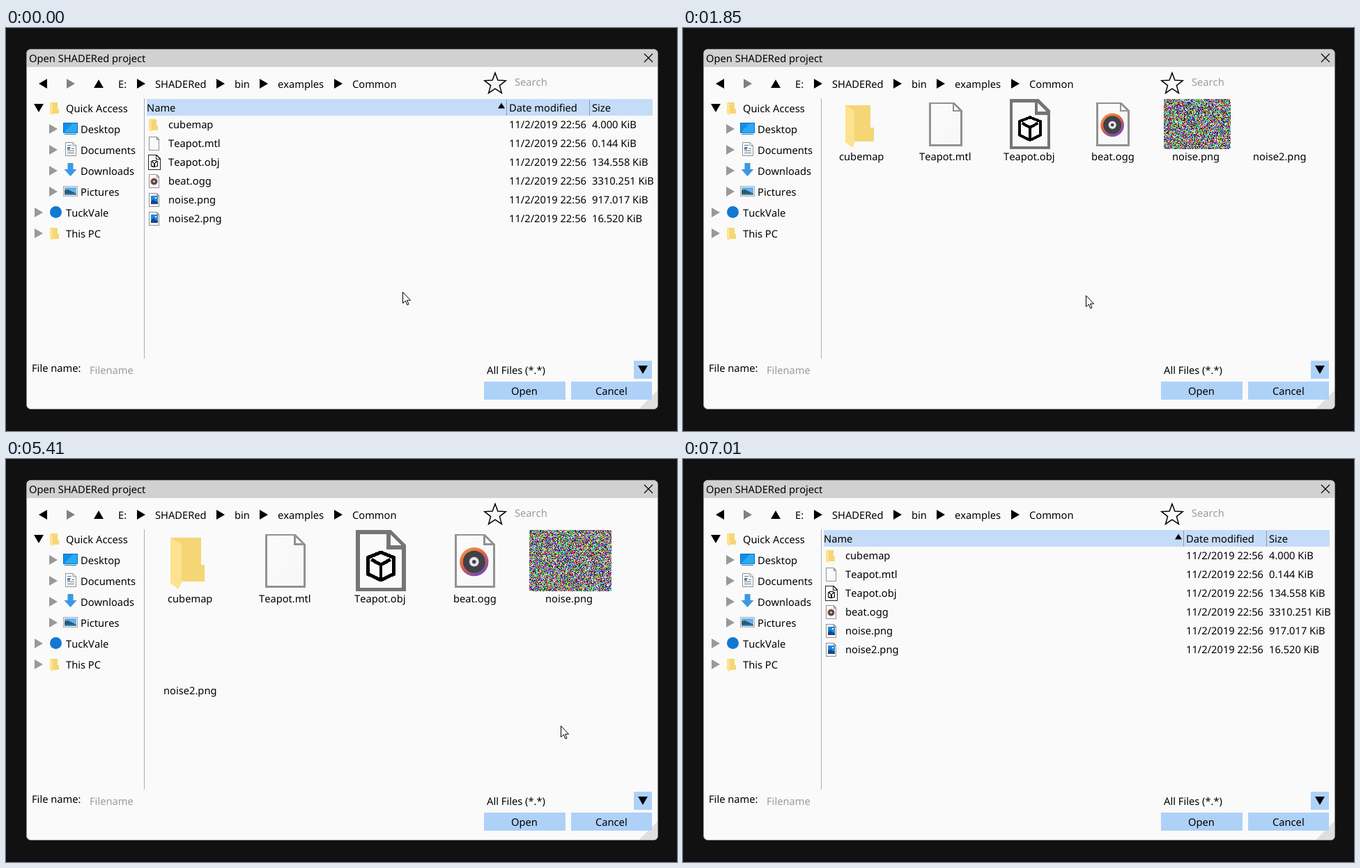
Recreate the animation shown at these times as an HTML page with a canvas. Size 963x579 px, loop 7670 ms.

```html
<!DOCTYPE html>
<html lang="en">
<head>
<meta charset="utf-8">
<title>File dialog</title>
<style>
  html, body { margin: 0; width: 100%; height: 100%; overflow: hidden; background: #111; }
  svg { position: absolute; left: 0; top: 0; display: block; }
  canvas { position: absolute; image-rendering: pixelated; }
  text { font: 14.68px "Noto Sans", sans-serif; font-kerning: none; text-rendering: geometricPrecision; white-space: pre; }
  .dim { fill: #9b9b9b; }
  .btn { fill: #aed1f8; }
  .hot { fill: #4296fa; }
  .icon { shape-rendering: crispEdges; }
  .line { fill: none; stroke: #929292; stroke-width: var(--w, 1); }
</style>
</head>
<body>
<svg width="963" height="579" viewBox="0 0 963 579">
  <defs>
    <linearGradient id="ring" x1="0" y1="0" x2=".6" y2="1">
      <stop offset="0" stop-color="#f0a050"/><stop offset=".45" stop-color="#e8683e"/><stop offset="1" stop-color="#7a4bb0"/>
    </linearGradient>
    <linearGradient id="paper" x1="0" y1="0" x2="1" y2="1">
      <stop offset="0" stop-color="#fbfbfb"/><stop offset="1" stop-color="#f7f7f8"/>
    </linearGradient>
    <symbol id="page" viewBox="0 0 32 32">
      <path d="M5.5 2.5H20.5L25.5 7.5V29.5H5.5Z" fill="url(#paper)"/>
      <path class="line" d="M5.5 2.5H20.5L25.5 7.5V29.5H5.5ZM20.5 2.5V7.5H25.5"/>
    </symbol>
    <symbol id="folder" viewBox="0 0 32 32">
      <path d="M5 4H21V18H23V27H9Z" fill="#f5d676"/>
      <path d="M5 4L10.8 7.4V28L9.3 31L5 27.7Z" fill="#fde28f"/>
    </symbol>
    <symbol id="model" viewBox="0 0 32 32">
      <g fill="none" stroke="currentColor" stroke-width="var(--m, 2)">
        <path d="M4 1H21L28 8V31H4Z" fill="#fafafa"/>
        <path d="M20 1V9H28"/>
      </g>
      <path d="M16 11.7L22.8 14.4V23L16 26.2L9.2 23V14.4ZM11 15.4L16 18.2L21 15.4M16 18.2V25" fill="none" stroke="#000" stroke-width="1.8" stroke-linejoin="round"/>
    </symbol>
    <symbol id="audio" viewBox="0 0 32 32">
      <use href="#page" width="32" height="32"/>
      <g shape-rendering="auto">
        <circle cx="15.2" cy="16.6" r="7.5" fill="url(#ring)"/>
        <circle cx="15.2" cy="16.6" r="5.8" fill="#434148"/>
        <circle cx="15.2" cy="16.6" r="2.5" fill="#e6e4ee"/>
        <circle cx="15.2" cy="16.6" r="1" fill="#434148"/>
      </g>
    </symbol>
    <symbol id="image" viewBox="0 0 32 32">
      <use href="#page" width="32" height="32"/>
      <path d="M9 7.5H23V25H9Z" fill="#1f87dc"/>
      <path d="M9 19.5L13.6 14.8L18.8 20L20.6 18.2L23 20.6V25H9Z" fill="#1b4684"/>
      <circle cx="19.4" cy="11.8" r="1.7" fill="#fff"/>
    </symbol>
  </defs>
  <g id="chrome"></g>
  <g id="files"></g>
  <path id="cursor" d="M.5 .5V16.5L4.3 12.9L6.8 18.9L9 18L6.5 12.2H11.5Z" fill="#fff" stroke="#000"/>
</svg>
<canvas id="noise" width="138" height="104"></canvas>
<script>
const LOOP = 7670;
const $ = id => document.getElementById(id);

const ruler = document.createElement('canvas').getContext('2d');
ruler.font = '14.68px "Noto Sans", sans-serif';
ruler.fontKerning = 'none';

const text = (x, y, s, extra = '') => `<text x="${x}" y="${y}" ${extra}>${s}</text>`;
const startOf = (cx, s) => Math.floor(cx - ruler.measureText(s).width / 2);
const centred = (cx, y, s) => text(startOf(cx, s), y, s);
const rect = (x, y, w, h, extra) => `<rect x="${x}" y="${y}" width="${w}" height="${h}" ${extra}/>`;
const path = (d, extra = '') => `<path d="${d}" ${extra}/>`;
const arrow = (cx, cy, turn = 0, fill = '#000') =>
  path('M6 0L-6 6.93V-6.93Z', `transform="translate(${cx} ${cy}) rotate(${turn})" fill="${fill}"`);
const icon = (id, x, y, size, color = '#757575') => {
  const px = 32 / size;
  return `<use class="icon" href="#${id}" x="${x}" y="${y}" width="${size}" height="${size}" ` +
    `style="--w:${Math.max(1, px)};--m:${Math.max(2, px)};color:${color}"/>`;
};

const files = [
  { name: 'cubemap', icon: 'folder', wrap: ['cubema', 'p'], size: '4.000' },
  { name: 'Teapot.mtl', icon: 'page', wrap: ['Teapot.', 'mtl'], size: '0.144' },
  { name: 'Teapot.obj', icon: 'model', wrap: ['Teapot.', 'obj'], size: '134.558' },
  { name: 'beat.ogg', icon: 'audio', size: '3310.251' },
  { name: 'noise.png', icon: 'image', wrap: ['noise.', 'png'], size: '917.017', preview: 1780 },
  { name: 'noise2.png', icon: 'image', wrap: ['noise2.', 'png'], size: '16.520', preview: 1850 }
];

// Icon size over time; 0 is the detail list
const views = [[0, 0], [830, 24], [1280, 40], [1510, 56], [1720, 72], [2360, 88], [2760, 104],
  [4390, 88], [5590, 72], [5650, 56], [5690, 40], [5770, 24], [5890, 0]];

// Pointer moves: start, end, steps, x, y, easing power
const moves = [
  [0, 0, 1, 569, 379], [60, 60, 1, 570, 379], [370, 430, 3, 577, 379], [920, 980, 2, 577, 382],
  [1720, 1850, 3, 578, 384], [4880, 5050, 5, 909, 607], [5200, 5200, 1, 865, 580],
  [5290, 5410, 4, 796, 383], [5590, 5650, 2, 794, 383], [5690, 5890, 5, 790, 391],
  [6380, 6420, 2, 789, 393], [6610, 7010, 13, 775, 582, 1.5]
];

function pointer(t) {
  let x = 569, y = 379;
  for (const [start, end, n, toX, toY, pow = 1] of moves) {
    if (t < start) break;
    const gap = (end - start) / (n - 1 || 1);
    const step = gap ? Math.min(n, 1 + Math.floor((t - start) / gap + 1e-6)) : n;
    const k = (step / n) ** pow;
    x += (toX - x) * k;
    y += (toY - y) * k;
  }
  return [Math.round(x), Math.round(y)];
}

function star(cx, cy, r) {
  const pts = Array.from({ length: 10 }, (_, i) => {
    const a = i * Math.PI / 5 - Math.PI / 2, d = i % 2 ? r * .42 : r;
    return `${(cx + d * Math.cos(a)).toFixed(1)},${(cy + d * Math.sin(a)).toFixed(1)}`;
  });
  return `<polygon points="${pts.join(' ')}" fill="none" stroke="#000" stroke-width="1.5"/>`;
}

function sidebar() {
  const gray = '#999';
  const names = ['Desktop', 'Documents', 'Downloads', 'Pictures'];
  return path('M198.5 101V475', 'stroke="#aaaac6"') +
    arrow(47, 115, 90) + icon('folder', 60, 104, 22) + text(86, 121, 'Quick Access') +
    names.map((s, i) => arrow(68, 145 + 30 * i, 0, gray) + text(107, 151 + 30 * i, s)).join('') +
    // desktop
    rect(82.5, 136.5, 20, 14, 'fill="#0f8fe8" stroke="#0b6fbf"') +
    path('M83 150L96 137H102V150Z', 'fill="#2aa9f5"') + path('M84 152.5H101', 'stroke="#0b6fbf"') +
    // documents
    path('M85.5 164.5H96L100.5 169V183.5H85.5Z', 'fill="#fff" stroke="#8b8f94"') +
    path('M96 164.5V169H100.5', 'fill="none" stroke="#8b8f94"') +
    path('M88 168.5H94M88 171.5H93M94 173.5H98M88 176.5H98M88 179.5H98', 'stroke="#5e7385"') +
    rect(88, 172, 4, 3, 'fill="#4b8dbd"') +
    // downloads
    path('M88.5 194H96.5V203H101.5L92.5 213L83.5 203H88.5Z', 'fill="#3a98e6"') +
    // pictures
    rect(82.5, 227.5, 20, 14, 'fill="#fff" stroke="#a0a4a8"') + rect(84, 229, 17, 11, 'fill="#62b3ee"') +
    path('M84 233L89 232L101 238V240H84Z', 'fill="#2d5a70"') + path('M84 238H101V240H84Z', 'fill="#3c7cae"') +
    arrow(47, 265, 0, gray) + '<circle cx="71.5" cy="264.5" r="8.5" fill="#1278d2"/>' + text(86, 271, 'TuckVale') +
    arrow(47, 295, 0, gray) + icon('folder', 60, 284, 22) + text(86, 301, 'This PC');
}

function chrome() {
  const crumbs = [[161, 'E:'], [214, 'SHADERed'], [328, 'bin'], [390, 'examples'], [497, 'Common']];
  return rect(29.5, 30.5, 906, 517, 'rx="6" fill="#fafafa" stroke="#8c8c8c"') +
    path('M30 56V36.5Q30 31 35.5 31H929.5Q935 31 935 36.5V56Z', 'fill="#d1d1d1"') +
    text(33, 49, 'Open SHADERed project') +
    path('M916 37L928 49M928 37L916 49', 'stroke="#000" stroke-width="1.2"') +
    arrow(53, 80, 180) + arrow(93, 80, 0, '#808080') + arrow(133, 80, -90) +
    [194, 308, 370, 477].map(x => arrow(x, 80)).join('') +
    crumbs.map(([x, s]) => text(x, 86, s)).join('') +
    star(702, 80.5, 16) + text(730, 83, 'Search', 'class="dim"') +
    sidebar() +
    text(37, 494, 'File name:') + text(120, 497, 'Filename', 'class="dim"') +
    rect(686, 478, 215, 26, 'id="combo" class="btn" opacity="0"') + text(690, 497, 'All Files (*.*)') +
    rect(901, 478, 26, 26, 'id="drop" class="btn"') + arrow(914, 491, 90) +
    path('M935 520.5V542Q935 547 930 547H908.5Z', 'fill="#dfdfdf"') +
    rect(686, 508, 117, 26, 'id="open" class="btn"') + rect(811, 508, 116, 26, 'class="btn"') +
    centred(744.5, 527, 'Open') + centred(869, 527, 'Cancel');
}

function list() {
  return rect(202, 102, 726, 24, 'fill="#c5dcf8"') +
    path('M718.5 103V126M837.5 103V126', 'stroke="#9797ad"') + path('M706 115.5H716L711 107.5Z') +
    text(202, 120, 'Name') + text(722, 120, 'Date modified') + text(841, 120, 'Size') +
    files.map((f, i) => {
      const y = 144 + 27 * i;
      return icon(f.icon, 202, y - 16, 22, '#222') + text(233, y, f.name) +
        text(722, y, '11/2/2019 22:56') + text(841, y, f.size + ' KiB');
    }).join('');
}

function label(f, cx, y, size) {
  if (size > 24 || !f.wrap) return centred(cx, y, f.name);
  const x = startOf(cx, f.wrap[0]);
  return f.wrap.map((s, i) => text(x, y + 20 * i, s)).join('');
}

// Icon centre and top of a grid cell
function cell(i, size) {
  const cols = size > 100 ? 4 : size > 80 ? 5 : 6;
  return [198 + (size + 48) * (i % cols + .5), 102 + (size + 44) * Math.floor(i / cols)];
}

const ready = (f, t, size) => size >= 72 && t >= f.preview;

function grid(size, t) {
  return files.map((f, i) => {
    const [cx, y] = cell(i, size);
    return (ready(f, t, size) ? '' : icon(f.icon, cx - size / 2, y, size)) +
      label(f, cx - 1, y + size + 16, size);
  }).join('');
}

function paintNoise() {
  const { width, height } = $('noise');
  const c = $('noise').getContext('2d'), img = c.createImageData(width, height);
  let seed = 20191;
  const rnd = () => (seed = (seed * 1664525 + 1013904223) % 4294967296) / 4294967296;
  for (let i = 0; i < img.data.length; i++) {
    img.data[i] = i % 4 === 3 ? 255 : 132 + (rnd() - .5) * 560;
  }
  c.putImageData(img, 0, 0);
}

function placeNoise(size, t) {
  const style = $('noise').style, on = ready(files[4], t, size);
  style.display = on ? 'block' : 'none';
  if (!on) return;
  const [cx, y] = cell(4, size), w = Math.round(size * 2 / 3) * 2;
  style.left = cx - w / 2 + 'px';
  style.top = y + 'px';
  style.width = w + 'px';
  style.height = size + 'px';
}

let shown = '';
function render(t) {
  const size = views.filter(v => v[0] <= t).pop()[1];
  const key = [size, ...files.map(f => ready(f, t, size))].join();
  if (key !== shown) {
    shown = key;
    $('files').innerHTML = size ? grid(size, t) : list();
    placeNoise(size, t);
  }
  const [x, y] = pointer(t);
  $('cursor').setAttribute('transform', `translate(${x} ${y})`);
  const over = (top, end) => t > 6600 && y >= top && y < end;
  $('combo').setAttribute('opacity', over(478, 504) ? 1 : 0);
  $('drop').setAttribute('class', over(478, 504) ? 'hot' : 'btn');
  $('open').setAttribute('class', over(508, 534) ? 'hot' : 'btn');
}

$('chrome').innerHTML = chrome();
paintNoise();
const begin = performance.now();
function tick() {
  render((performance.now() - begin) % LOOP);
  requestAnimationFrame(tick);
}
tick();
</script>
</body>
</html>
```
